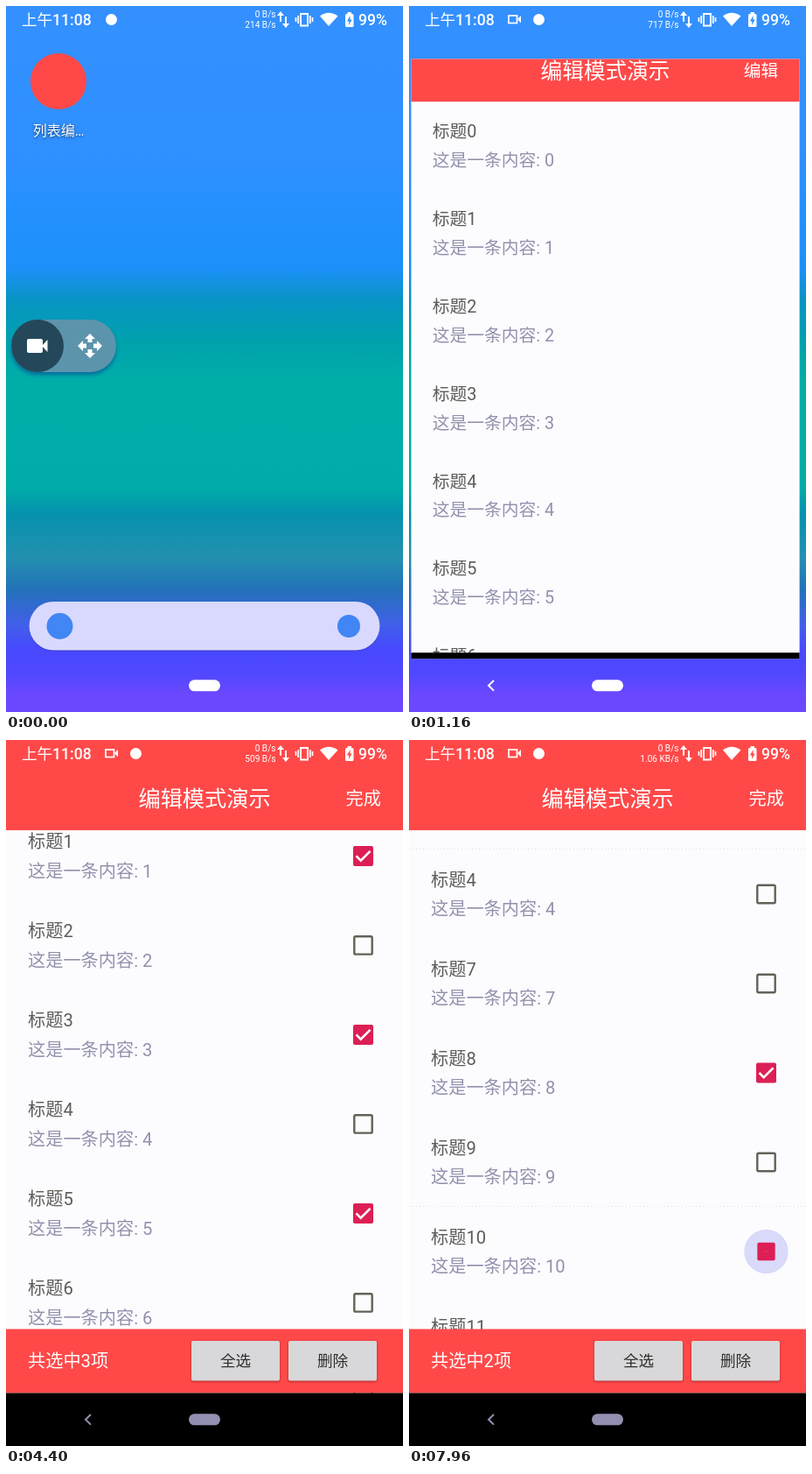
Write an HTML page with a canvas that moves like this. It is 454x806 px and loops after 8 s.

```html
<!DOCTYPE html>
<html lang="zh-CN">
<head>
<meta charset="utf-8">
<style>
html, body { margin: 0; width: 100%; height: 100%; overflow: hidden; background: #000; }
canvas { display: block; width: 454px; height: 806px; }
</style>
</head>
<body>
<canvas id="stage" width="454" height="806"></canvas>
<script>
const W = 454, H = 806, LOOP = 8000, ROW = 102, TOP = 103;
const OPEN = 840, EDIT = 2560, DELETE = 5760;
const RED = '#ff4949', ACCENT = '#dc1f55', PAPER = '#fcfcff';
const TAPS = { 5: 3240, 3: 3640, 1: 4040, 6: 5090, 8: 7320, 10: 7780 };
const REMOVED = [1, 3, 5, 6];
const c = document.getElementById('stage').getContext('2d');

const ramp = (t, a, b) => Math.min(1, Math.max(0, (t - a) / (b - a)));
const out = (u, k) => 1 - (1 - u) ** k;
const smooth = u => u * u * (3 - 2 * u);
const mix = (a, b, u) => a + (b - a) * u;

function layer(draw, alpha = 1) {
  c.save();
  c.globalAlpha *= alpha;
  draw();
  c.restore();
}
function rect(x, y, w, h, color, r = 0) {
  c.fillStyle = color;
  c.beginPath();
  c.roundRect(x, y, w, h, r);
  c.fill();
}
function disc(x, y, r, color) {
  c.fillStyle = color;
  c.beginPath();
  c.arc(x, y, r, 0, 7);
  c.fill();
}
function path(points, closed) {
  c.beginPath();
  points.forEach(p => c.lineTo(...p));
  if (closed) c.closePath();
}
function poly(points, color) {
  c.fillStyle = color;
  path(points, true);
  c.fill();
}
function line(points, color, width) {
  c.strokeStyle = color;
  c.lineWidth = width;
  path(points);
  c.stroke();
}
// y is the middle of the capitals
function text(s, x, y, size, color, align = 'left', weight = 400) {
  c.font = `${weight} ${size}px Roboto, "Noto Sans CJK SC", "Noto Sans CJK", sans-serif`;
  c.textAlign = align;
  c.fillStyle = color;
  c.fillText(s, x, y + size * .36);
}

function wallpaper() {
  const g = c.createLinearGradient(0, 0, 0, H);
  [[0, '#3490ff'], [180, '#2e90ff'], [230, '#2490ff'], [300, '#1c90f8'], [335, '#0894c4'],
   [385, '#00a2ac'], [430, '#00aea8'], [550, '#00aca8'], [580, '#0692ae'], [630, '#2490b0'],
   [665, '#2272b8'], [705, '#4060e8'], [735, '#4848ff'], [762, '#5048ff'], [785, '#6a48ff'],
   [H, '#6c48ff']].forEach(([y, color]) => g.addColorStop(y / H, color));
  c.fillStyle = g;
  c.fillRect(0, 0, W, H);
}

function recorder() {
  layer(() => {
    c.shadowColor = 'rgba(0,80,150,.7)';
    c.shadowBlur = 4;
    c.shadowOffsetY = 3;
    rect(6, 358, 120, 60, '#5c94ac', 30);
  });
  disc(36, 388, 30, '#24485a');
  rect(24, 380, 18, 16, '#fff', 2);
  poly([[41, 388], [47.5, 381], [47.5, 395]], '#fff');
  for (let i = 0; i < 4; i++) layer(() => {
    c.translate(96, 388);
    c.rotate(i * Math.PI / 2);
    poly([[0, -14], [6, -8], [2.5, -8], [2.5, -4], [-2.5, -4], [-2.5, -8], [-6, -8]], '#fff');
  });
}

function launcher(t, u) {
  wallpaper();
  if (u <= 0) {
    disc(60, 86, 32, '#ff4848');
    layer(() => {
      c.shadowColor = 'rgba(0,0,0,.6)';
      c.shadowBlur = 3;
      c.shadowOffsetY = 1;
      text('列表编…', 60, 142, 16, '#fff', 'center');
    });
  }
  layer(() => {
    c.translate(0, 140 * u);
    rect(26.5, 680.5, 401, 56, 'rgba(20,20,90,.3)', 28);
    rect(26.5, 680, 401, 55.5, '#d9d9ff', 28);
    disc(61.5, 708, 15, '#4285f4');
    disc(392, 708, 13, '#4285f4');
  }, 1 - ramp(u, 0, .6));
  const a = 1 - ramp(t, 120, 400);
  if (a) layer(recorder, a);
}

function checkbox(n, x, y, t) {
  const dt = n in TAPS ? t - TAPS[n] : -1;
  layer(() => {
    c.translate(x, y);
    if (dt < 0) {
      c.strokeStyle = '#626258';
      c.lineWidth = 2.4;
      c.beginPath();
      c.roundRect(-10.2, -10.2, 20.4, 20.4, 1.5);
      c.stroke();
      return;
    }
    const ripple = 1 - ramp(dt, 180, 275);
    if (ripple) layer(() => disc(0, 0, mix(8, 25.2, out(ramp(dt, 0, 130), 2)), '#d9d9fa'), ripple);
    const fill = ramp(dt, 0, 150), tick = ramp(dt, 160, 345);
    const s = mix(mix(1, .87, fill), 1, tick);
    layer(() => {
      c.scale(s, s);
      rect(-11.5, -11.5, 23, 23, ACCENT, 2);
      const hole = 9 * (1 - fill);
      if (hole) rect(-hole, -hole, hole * 2, hole * 2, PAPER);
    });
    if (tick) {
      c.scale(tick, tick);
      line([[-8, 0], [-2.8, 5.2], [8, -5.6]], '#fff', 2.6);
    }
  });
}

function list(t) {
  const scroll = 284 * out(ramp(t, 4200, 4880), 1.63);
  const shift = smooth(ramp(t, DELETE + 120, DELETE + 370));
  const boxes = ramp(t, EDIT - 80, EDIT);
  for (let n = 0; n < 14; n++) {
    const gone = REMOVED.includes(n);
    const alpha = gone ? 1 - ramp(t, DELETE, DELETE + 120) : 1;
    // row 2 stays put, so only removals below it close up
    const closed = REMOVED.filter(r => r > 2 && r < n).length;
    const y = TOP + ROW * n - scroll - (gone ? 0 : closed * ROW * shift);
    if (!alpha || y > H || y < -ROW) continue;
    layer(() => {
      text('标题' + n, 25, y + 34.5, 20.2, '#5c5c58');
      text('这是一条内容: ' + n, 25, y + 68, 20.2, '#9291ac');
      if (boxes) layer(() => checkbox(n, 408.5, y + 51, t), boxes);
    }, alpha);
  }
  if (t >= 4880) {
    c.setLineDash([1, 3]);
    for (const y of [124.5, 532.5]) line([[0, y], [W, y]], '#dcdcee', 1);
    c.setLineDash([]);
  }
}

function button(label, x, press) {
  layer(() => {
    c.shadowColor = 'rgba(90,0,0,.5)';
    c.shadowBlur = 3;
    c.shadowOffsetY = 1;
    rect(x, 686, 101, 45.5, '#d8d8da', 2);
  });
  if (press) layer(() => rect(x, 686, 101, 45.5, '#000', 2), press * .14);
  text(label, x + 50.5, 709, 17.6, '#303030', 'center');
}

function bar(t) {
  const up = out(ramp(t, EDIT, EDIT + 240), 2);
  if (!up) return;
  const count = Object.entries(TAPS)
    .filter(([n, at]) => t >= at && (t < DELETE || !REMOVED.includes(+n))).length;
  layer(() => {
    c.translate(0, 72.5 * (1 - up));
    rect(0, 672.5, W, 73, RED);
    text(`共选中${count}项`, 25, 709, 20.2, '#fff');
    button('全选', 212, 0);
    button('删除', 323, ramp(t, 5700, 5780) * (1 - ramp(t, 5860, 6340)));
  });
}

function app(t) {
  rect(0, 0, W, H, PAPER);
  list(t);
  rect(0, 0, W, TOP, RED);
  text('编辑模式演示', 227, 67, 25.2, '#fff', 'center');
  text(t < EDIT ? '编辑' : '完成', 429, 67, 20.2, '#fff', 'right');
  bar(t);
  rect(0, 745.5, W, H - 745.5, '#000');
}

// window grows out of the launcher icon, its crop opening from a square
function appWindow(t, u) {
  const s = mix(.141, 1, out(u, 2.29));
  const x = mix(60, W / 2, out(u, 2.6));
  const y = mix(86, H / 2, out(u, 5.88));
  const h = mix(W, H, u ** 1.64);
  layer(() => {
    c.translate(x, y);
    c.scale(s, s);
    c.translate(-W / 2, -H / 2);
    c.beginPath();
    c.rect(0, (H - h) / 2, W, h);
    c.clip();
    app(t);
  }, ramp(u, 0, .345));
}

function statusBar(t) {
  const recording = t >= 400, white = '#fff';
  text('上午', 18, 15.5, 17.6, white);
  text('11:08', 53, 15.5, 17.6, white, 'left', 500);
  if (recording) {
    c.strokeStyle = white;
    c.lineWidth = 1.7;
    c.strokeRect(114, 11, 9.5, 8.5);
    poly([[124, 15], [128, 11], [128, 19.5]], white);
  }
  disc(recording ? 148.5 : 120.5, 15.5, 6.5, white);

  const speed = t < 880 ? '214 B/s' : t < 4100 ? '717 B/s' : t < DELETE ? '509 B/s' : '1.06 KB/s';
  text('0 B/s', 308.5, 9.5, 10.1, white, 'right');
  text(speed, 308.5, 21.5, 10.1, white, 'right');

  line([[314, 18], [314, 9]], white, 2);
  poly([[310, 11], [314, 6], [318, 11]], white);
  line([[320, 12], [320, 22]], white, 2);
  poly([[316, 20], [320, 25], [324, 20]], white);

  c.strokeStyle = white;
  c.lineWidth = 2;
  c.strokeRect(337, 9, 8, 13.5);
  for (const d of [-1, 1]) {
    line([[341 + d * 6.8, 11], [341 + d * 6.8, 20]], white, 1.7);
    line([[341 + d * 9.5, 13], [341 + d * 9.5, 18]], white, 1.7);
  }

  c.fillStyle = white;
  c.beginPath();
  c.moveTo(369, 23);
  c.lineTo(359, 11.5);
  c.quadraticCurveTo(369, 4, 379.5, 11.5);
  c.fill();

  rect(388, 9, 9.5, 15, white, 1.5);
  rect(390.5, 7, 4.5, 3, white);
  const ink = t < OPEN + 400 ? '#2e90ff' : RED;
  poly([[393.5, 11], [390, 17.5], [392.3, 17.5], [392, 22], [395.6, 15.5], [393.5, 15.5]], ink);
  text('99%', 403, 15.5, 17.6, white, 'left', 500);
}

function navigation(t, u) {
  const k = ramp(t, 2400, 2640);
  const color = `rgb(${mix(255, 146, k)},${mix(255, 144, k)},${mix(255, 176, k)})`;
  if (u > 0) layer(() => line([[97, 770], [91, 775.8], [97, 781.6]], color, 2), ramp(u, 0, .8));
  rect(209, 769.3, 36, 13, color, 6.5);
}

function frame() {
  const t = performance.now() % LOOP;
  const u = ramp(t, OPEN, OPEN + 400);
  if (u < 1) launcher(t, u);
  if (u > 0) appWindow(t, u);
  statusBar(t);
  navigation(t, u);
  requestAnimationFrame(frame);
}
frame();
</script>
</body>
</html>
```
